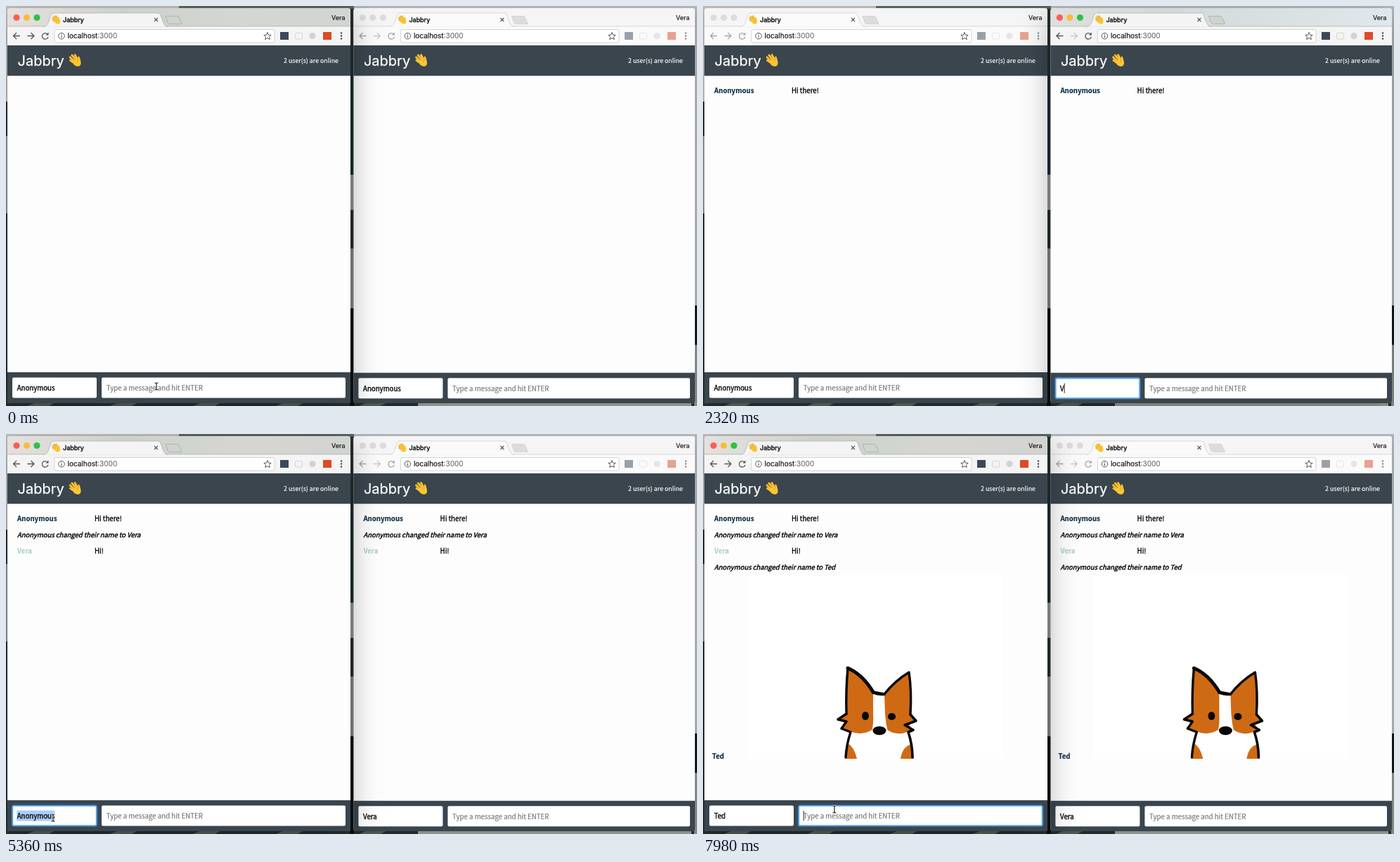
An HTML page with a canvas for the animation above (8000 ms loop, 983 by 569 pixels).

```html
<!DOCTYPE html>
<html lang="en">
<head>
<meta charset="utf-8">
<title>Chat demo</title>
<style>
html, body { margin: 0; width: 100%; height: 100%; overflow: hidden; background: #222c29; }
canvas { display: block; width: 983px; height: 569px; }
</style>
</head>
<body>
<canvas id="stage" width="983" height="569"></canvas>
<script>
const ctx = document.getElementById('stage').getContext('2d');
const LOOP = 8000;
const UI = 'Inter, Roboto, sans-serif';
const PAGE = '"Noto Sans CJK JP", "Noto Sans CJK SC", "Noto Sans CJK", "Open Sans", sans-serif';
const BODY = `9.67px ${PAGE}`;
const MEDIUM = 0.4;
const APP = 'Jabbry', ANN = 'Vera', TOM = 'Ted', ANON = 'Anonymous';

const windows = [
  { x0: 2, x1: 490, foot: 521, col: 126, tint: ['#e4e1df', '#cbd2cb', '#d4d6d1', '#d2d4d2'] },
  { x0: 494.4, x1: 980, foot: 521.7, col: 617.6, tint: ['#dfdfdf', '#d3d9d8', '#d9e0e2', '#dfe8ed'] }
];

// Each step changes part of the state at a given time.
const steps = [
  [0, { active: 0, field: '', names: [ANON, ANON], selected: false }],
  [250, { field: 'msg' }],
  [1800, { active: 1, field: 'name' }],
  [2000, { selected: true }],
  [2200, { selected: false }],
  [3150, { field: 'msg' }],
  [4950, { active: 0, field: 'name' }],
  [5100, { selected: true }],
  [5600, { selected: false }],
  [6700, { field: 'msg' }]
];

const typing = [
  { win: 0, field: 'msg', text: 'Hi there!', at: 400, gap: 85, sent: 1240 },
  { win: 1, field: 'name', text: ANN, at: 2200, gap: 130, sent: 2750 },
  { win: 1, field: 'msg', text: 'Hi!', at: 3400, gap: 130, sent: 3840 },
  { win: 0, field: 'name', text: TOM, at: 5600, gap: 130, sent: 6200 },
  { win: 0, field: 'msg', text: '/gif corgi', at: 6850, gap: 60, sent: 7550 }
];

const log = [
  { at: 1240, y: 124, who: ANON, text: 'Hi there!', color: '#0f2f49' },
  { at: 2750, y: 147, note: `${ANON} changed their name to ${ANN}` },
  { at: 3840, y: 170, who: ANN, text: 'Hi!', color: '#aed3c4' },
  { at: 6200, y: 193, note: `${ANON} changed their name to ${TOM}` },
  { at: 7550, y: 462, who: TOM, dog: true, color: '#0f2f49' }
];

const pointerPath = [
  [0, 214, 541], [1100, 214, 541], [1400, 422, 559], [1700, 565, 545], [2800, 565, 545],
  [3120, 691, 541], [3950, 691, 541], [4380, 373, 555], [4850, 67, 546], [6200, 67, 546],
  [6480, 187, 546], [6660, 187, 534], [8000, 187, 534]
];

function stateAt(t) {
  const s = { msgs: ['', ''], mark: 0 };
  for (const [at, patch] of steps) if (t >= at) {
    Object.assign(s, patch);
    s.mark = at;
  }
  s.names = [...s.names];
  for (const k of typing) if (t >= k.at) {
    const count = Math.min(k.text.length, 1 + Math.floor((t - k.at) / k.gap));
    if (k.field === 'name') s.names[k.win] = k.text.slice(0, count);
    else s.msgs[k.win] = t < k.sent ? k.text.slice(0, count) : '';
    s.mark = Math.max(s.mark, t < k.sent ? k.at + (count - 1) * k.gap : k.sent);
  }
  s.caret = s.field && !s.selected && Math.floor((t - s.mark) / 530) % 2 === 0;
  return s;
}

function pointerAt(t) {
  const i = pointerPath.findIndex(p => p[0] > t);
  const [ta, xa, ya] = pointerPath[i - 1], [tb, xb, yb] = pointerPath[i];
  const u = (t - ta) / (tb - ta), e = u * u * (3 - 2 * u);
  return [xa + (xb - xa) * e, ya + (yb - ya) * e];
}

function rect(x, y, w, h, color) {
  ctx.fillStyle = color;
  ctx.fillRect(x, y, w, h);
}

function box(x, y, w, h, r, fill, stroke, width = 1) {
  ctx.beginPath();
  ctx.roundRect(x, y, w, h, r);
  if (fill) { ctx.fillStyle = fill; ctx.fill(); }
  if (stroke) { ctx.strokeStyle = stroke; ctx.lineWidth = width; ctx.stroke(); }
}

function dot(x, y, r, fill, stroke, ry = r) {
  ctx.beginPath();
  ctx.ellipse(x, y, r, ry, 0, 0, 7);
  if (fill) { ctx.fillStyle = fill; ctx.fill(); }
  if (stroke) { ctx.strokeStyle = stroke; ctx.lineWidth = 1; ctx.stroke(); }
}

function path(d, fill, stroke, width = 1) {
  const p = new Path2D(d);
  if (fill) { ctx.fillStyle = fill; ctx.fill(p); }
  if (stroke) { ctx.strokeStyle = stroke; ctx.lineWidth = width; ctx.stroke(p); }
}

// A hairline outline thickens the strokes of the letters.
function text(str, x, y, font, color, { align = 'left', weight = 0.18 } = {}) {
  ctx.font = font;
  ctx.textAlign = align;
  ctx.fillStyle = ctx.strokeStyle = color;
  ctx.lineWidth = weight;
  ctx.fillText(str, x, y);
  ctx.strokeText(str, x, y);
}

function at(x, y, scale, draw) {
  ctx.save();
  ctx.translate(x, y);
  ctx.scale(scale, scale);
  draw();
  ctx.restore();
}

function desktop() {
  rect(0, 0, 983, 569, '#26312e');
  rect(0, 0, 246, 4, '#c3bfbd');
  rect(246, 0, 249, 4, '#5c665e');
  rect(495, 0, 488, 4, '#b9babb');
  rect(0, 0, 3, 136, '#c5bdbd');
  rect(0, 185, 3, 110, '#8f9694');
  rect(979, 0, 4, 426, '#b6b7b9');
  rect(979, 426, 4, 56, '#111a18');
  rect(979, 482, 4, 87, '#8d918d');
  rect(489, 90, 6, 150, '#1d3034');
  rect(489, 240, 6, 50, '#9a9c98');
  rect(489, 345, 6, 85, '#8a8c88');
  rect(489, 430, 6, 139, '#0c1110');
  for (let x = 30; x < 560; x += 118) path(`M${x} 569l12-5h28l-9 5z`, '#59645a');
  rect(586, 564, 389, 5, '#a2a49f');
}

function hand() {
  ctx.lineCap = 'round';
  const fingers = 'M9 14L2.4 9.4M9 12L2 5.2M11 10L4.6 2.4M12.5 9L8.6 2';
  path(fingers, null, '#dc971c', 2.9);
  path(fingers, null, '#fcc634', 2);
  path('M6 11L10 7L13 9Q12 4.5 13.6 3.6Q15.4 4.6 16 9Q18 14 15 17Q11 19 7 15Z', '#fcc634');
  path('M13 8Q11 10 12 12', null, '#dc9a20', 0.8);
  ctx.lineCap = 'butt';
}

function dog() {
  const ink = '#090706', fur = '#cf6a14';
  const ears = 'M204 398Q203 365 206 333Q227 342 242 367L258 370Q273 351 293 339Q297 365 295 399';
  ctx.lineJoin = 'round';
  ctx.lineCap = 'round';
  path('M207 424Q204 442 203 462H300Q299 440 293 420Z', '#fff');
  path('M206 440Q215 445 219 462H203ZM297 441Q284 444 281 462H300Z', fur);
  path(`${ears}L303 408L293 412L297 421L290 424Q275 430 261 420H242Q226 430 209 423L197 419L204 409L192 406Z`, fur);
  path('M242 370H258L259 398Q260 412 263 424H240Q243 410 242 398Z', '#fff');
  path(ears, null, ink, 3.4);
  path('M206 333Q227 342 242 367', null, ink, 5);
  path('M242 368Q250 371 258 370', null, ink, 4);
  path('M204 398L192 406L204 409L197 419L210 424Q204 442 203 460', null, ink, 3.4);
  path('M295 399L303 408L287 414L299 421L292 424Q298 442 298 460', null, ink, 3.6);
  dot(231, 401, 5, ink, null, 6);
  dot(268.5, 402, 5.6, ink, null, 5);
  dot(251, 422, 9.5, ink, null, 6.2);
  ctx.lineCap = 'butt';
  ctx.lineJoin = 'miter';
}

function chrome(w, active) {
  const { x0, x1 } = w;
  const bar = ctx.createLinearGradient(x0, 0, x1, 0);
  w.tint.forEach((c, i) => bar.addColorStop(i / 3, active ? c : '#f5f5f5'));
  box(x0, 3, x1 - x0, 30, [4, 4, 0, 0], bar);
  rect(x0, 29, x1 - x0, 27, active ? '#f4f4f4' : '#fafafa');

  const lights = active ? ['#fb5e54', '#fabc36', '#2ec146'] : ['#dcdcdc', '#dcdcdc', '#dcdcdc'];
  lights.forEach((c, i) => dot(x0 + 13 + i * 14.5, 16.5, 4.6, c));

  const edge = active ? '#aeb2ae' : '#cfcfcf';
  rect(x0, 28.5, x1 - x0, 0.8, edge);
  at(x0, 0, 1, () => {
    path('M51 29.5Q56 29 58 24L62 13Q63 10 66 10H214Q217 10 218 13L222 24Q224 29 228 29.5Z',
      active ? '#f4f4f4' : '#fafafa', edge, 0.8);
    rect(52, 29.2, 175, 1.2, active ? '#f4f4f4' : '#fafafa');
    path('M225 14.5H241Q243 14.5 244 16L248 25.5H231Q229 25.5 228 23Z',
      active ? '#d0d4cf' : '#dcdcdc', active ? '#a8aca8' : '#d0d0d0', 0.8);
    path('M209 17l5 5M214 17l-5 5', null, '#555', 1.1);
  });
  at(x0 + 63, 13, 0.72, hand);
  text(APP, x0 + 79, 22.7, `9px ${UI}`, '#111', { weight: MEDIUM });
  text(ANN, x1 - 7.5, 20, `9px ${UI}`, '#111', { align: 'right' });

  const nav = active ? '#555' : '#a5a5a5';
  const ahead = x0 > 100 ? '#c8c8c8' : nav;
  at(x0, 0, 1, () => {
    path('M18 42.5H8.5M13 38L8.5 42.5L13 47', null, nav, 1.3);
    path('M28.5 42.5H38M33.5 38L38 42.5L33.5 47', null, ahead, 1.3);
    path('M57 40A4.3 4.3 0 1 0 57.9 44', null, nav, 1.3);
    path('M58.5 37.5V41.5H54.5Z', nav);
  });
  box(x0 + 67, 33.5, x1 - x0 - 175, 18.5, 2, '#fff', '#cfcfcf', 0.9);
  dot(x0 + 77, 42.7, 4.3, null, '#555');
  rect(x0 + 76.5, 41.8, 1.1, 3.4, '#555');
  rect(x0 + 76.5, 39.8, 1.1, 1.1, '#555');
  text('localhost', x0 + 85.5, 46.4, `10px ${UI}`, '#111');
  const hostWidth = ctx.measureText('localhost').width;
  text(':3000', x0 + 85.5 + hostWidth, 46.4, `10px ${UI}`, '#707070');

  at(x1, 0, 1, () => {
    path('M-118 37.5L-116.5 41.2L-112.8 41.4L-115.6 43.9L-114.7 47.6L-118 45.6L-121.3 47.6L-120.4 43.9L-123.2 41.4L-119.5 41.2Z', null, '#555');
    ctx.globalAlpha = active ? 1 : 0.5;
    rect(-100, 37, 12, 11, '#3c4859');
    box(-78.5, 38.5, 10, 8.5, 1, null, '#d4d4d4');
    dot(-54, 42.5, 4.6, '#d2d2d2');
    rect(-39, 37, 12, 11, '#dc4a25');
    ctx.globalAlpha = 1;
    for (const y of [38.5, 42.5, 46.5]) dot(-13, y, 1.2, active ? '#444' : '#888');
  });
}

function input(x, y, w, value, weight, focused, s) {
  ctx.save();
  if (focused) {
    ctx.shadowColor = 'rgba(60,155,243,.8)';
    ctx.shadowBlur = 3;
  }
  box(x, y, w, 29, 2, '#fff');
  ctx.restore();
  if (focused) box(x + 0.3, y + 0.3, w - 0.6, 28.4, 2, null, '#51a7f5', 1.8);
  ctx.font = BODY;
  const width = ctx.measureText(value).width;
  if (focused && s.selected) rect(x + 6.5, y + 7, width, 15, '#a9d0f8');
  if (value) text(value, x + 6.7, y + 18.3, BODY, '#111', { weight });
  else text('Type a message and hit ENTER', x + 6.7, y + 18.3, BODY, '#757575');
  if (focused && s.caret) rect(x + 6.7 + width, y + 7.5, 1, 14, '#222');
}

function drawWindow(i, s, t) {
  const w = windows[i], { x0, x1, foot } = w, active = s.active === i;
  const width = x1 - x0;
  ctx.save();
  ctx.shadowColor = active ? 'rgba(0,0,0,.3)' : 'rgba(0,0,0,.2)';
  ctx.shadowBlur = active ? 40 : 14;
  ctx.shadowOffsetY = active ? 12 : 4;
  box(x0, 3, width, 562, 4, '#fdfdfd');
  ctx.restore();

  chrome(w, active);
  rect(x0, 56, width, 43.3, '#3a454e');
  text(APP, x0 + 14.5, 84.7, `20px ${UI}`, '#fff', { weight: 0.25 });
  at(x0 + 87, 67.5, 1.05, hand);
  text('2 user(s) are online', x1 - 17, 81, `8.85px ${PAGE}`, '#fff', { align: 'right' });

  for (const m of log) if (t >= m.at) {
    if (m.note) {
      text(m.note, x0 + 14, m.y, `italic 9.46px ${PAGE}`, '#000', { weight: MEDIUM });
      continue;
    }
    if (m.dog) {
      rect(x0 + 62, 200, 362, 262, '#fff');
      at(x0 - 2, 0, 1, dog);
    }
    text(m.who, x0 + (m.dog ? 11 : 14), m.y, `bold ${BODY}`, m.color);
    if (m.text) text(m.text, w.col, m.y, BODY, '#000', { weight: 0.3 });
  }

  box(x0, foot, width, 565 - foot, [0, 0, 3, 3], '#3a454e');
  const focus = active ? s.field : '';
  input(x0 + 7, foot + 7.5, 120, s.names[i], MEDIUM, focus === 'name', s);
  input(x0 + 134, foot + 7.5, width - 141, s.msgs[i], 0.18, focus === 'msg', s);
}

function pointer(t, s) {
  // The pointer hides while keys are pressed.
  if (typing.some(k => t >= k.at && t < k.at + k.text.length * k.gap)) return;
  const [x, y] = pointerAt(t), w = windows[s.active];
  const over = (a, b) => x > a && x < b && y > 529 && y < 557;
  const beam = over(w.x0 + 7, w.x0 + 127) || over(w.x0 + 134, w.x1 - 7);
  at(x, y, 1, () => {
    if (beam) {
      const d = 'M-2.5 -5Q0 -5 0 -3.5Q0 -5 2.5 -5M0 -4V4M-2.5 5Q0 5 0 3.5Q0 5 2.5 5';
      path(d, null, '#fff', 2.4);
      path(d, null, '#222', 1.2);
    } else {
      path('M0 0V11L2.6 8.7L4.4 12.3L6.2 11.4L4.5 8H8Z', '#111', '#fff', 1);
    }
  });
}

function frame(now) {
  const t = now % LOOP, s = stateAt(t);
  desktop();
  drawWindow(1 - s.active, s, t);
  drawWindow(s.active, s, t);
  pointer(t, s);
}

const start = performance.now();
function tick() {
  frame(Math.max(0, performance.now() - start));
  requestAnimationFrame(tick);
}
tick();
</script>
</body>
</html>
```
